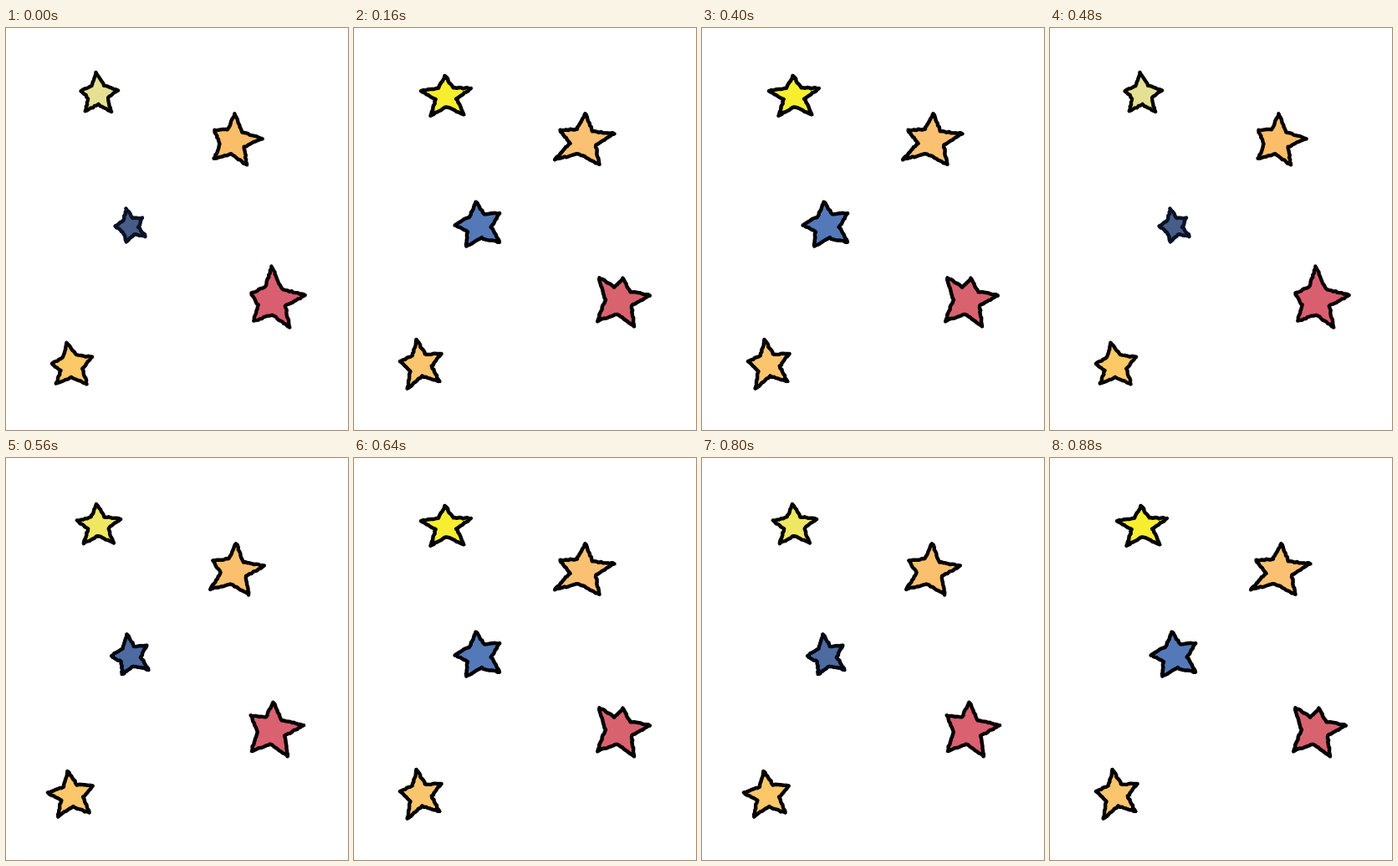
Recreate the animation shown at these times as an HTML page. Size 409 px wide and 480 px high, loop 0.96 s.

```html
<!DOCTYPE html>
<html lang="en">
<head>
<meta charset="utf-8">
<title>Twinkling stars</title>
<style>
html, body { margin: 0; width: 100%; height: 100%; overflow: hidden; background: #fff; }
svg { display: block; width: 100vw; height: 100vh; }
path { stroke-linejoin: round; stroke-linecap: round; }
</style>
</head>
<body>
<svg id="stage" viewBox="0 0 409 480"></svg>
<script>
const STEP = 80;
const NS = 'http://www.w3.org/2000/svg';
const stage = document.getElementById('stage');

// Each look: fill, outline edge, centre x, centre y, notch radius, then five tips clockwise from the top.
const stars = [
  { small: ['#e6e093', '#23220a', 110, 79, 12.5, [108,53, 134,74, 126,100, 95,99, 90,75]],
    big:   ['#f6ee2e', '#000', 110, 81, 13, [109,57, 140,72, 132,104, 91,105, 80,75]] },
  { small: ['#fabe69', '#1c1005', 271, 135, 15.5, [274,102, 307,132, 288,164, 249,156, 249,122]],
    big:   ['#fbc172', '#000', 274, 135, 16, [277,102, 311,126, 293,163, 240,157, 246,122]] },
  { small: ['#465d88', '#0a1226', 148, 237, 10.5, [144,215, 163,227, 167,249, 144,255, 131,237]],
    big:   ['#5479b8', '#000', 149, 236, 15, [146,207, 174,221, 174,256, 134,261, 120,235]] },
  { small: ['#d95f70', '#30060f', 318, 325, 17.5, [318,285, 358,319, 339,357, 296,350, 293,317]],
    big:   ['#d9626f', '#000', 317, 325, 16.5, [322,299, 354,319, 335,356, 291,350, 293,298]] },
  { small: ['#fbc965', '#1c1205', 78, 403, 14, [73,376, 103,393, 97,425, 60,425, 55,401]],
    big:   ['#fbc56d', '#000', 79, 402, 14, [75,372, 104,389, 102,422, 64,431, 55,398]],
    reach: 5 }
];

function random(seed) {
  return () => {
    seed = (seed * 16807) % 2147483647;
    return seed / 2147483647;
  };
}

const mix = (a, b) => (a + b) / 2;

function mixColor(a, b) {
  const parts = c => (c.length === 4 ? c.replace(/[0-9a-f]/g, '$&$&') : c)
    .match(/[0-9a-f]{2}/g).map(h => parseInt(h, 16));
  const q = parts(b);
  return `rgb(${parts(a).map((v, i) => Math.round(mix(v, q[i])))})`;
}

function between({ small: a, big: b, reach = 0 }) {
  const tips = a[5].map((v, i) => mix(v, b[5][i]));
  tips[8] -= reach;
  return [mixColor(a[0], b[0]), mixColor(a[1], b[1]),
    mix(a[2], b[2]), mix(a[3], b[3]), mix(a[4], b[4]), tips];
}

function corners(cx, cy, notch, tips) {
  const out = [];
  for (let i = 0; i < 5; i++) {
    const j = (i + 1) % 5;
    const x = tips[2 * i], y = tips[2 * i + 1];
    const dx = mix(x, tips[2 * j]) - cx;
    const dy = mix(y, tips[2 * j + 1]) - cy;
    const k = notch / Math.hypot(dx, dy);
    out.push([x, y], [cx + dx * k, cy + dy * k]);
  }
  return out;
}

// A closed line with a slightly shaky hand.
function roughPath(points, seed) {
  const rnd = random(seed);
  const shake = () => (rnd() - 0.5) * 1.3;
  const d = [];
  points.forEach(([x, y], i) => {
    const [u, v] = points[(i + 1) % points.length];
    const n = Math.max(2, Math.round(Math.hypot(u - x, v - y) / 2.5));
    for (let s = 0; s < n; s++) {
      const t = s / n;
      d.push(`${(x + (u - x) * t + shake()).toFixed(1)} ${(y + (v - y) * t + shake()).toFixed(1)}`);
    }
  });
  return `M${d.join('L')}Z`;
}

function addPath(group, d, fill, stroke, width) {
  const p = document.createElementNS(NS, 'path');
  const attrs = { d, fill, stroke, 'stroke-width': width };
  for (const name in attrs) p.setAttribute(name, attrs[name]);
  group.append(p);
}

function makePose(looks, seed) {
  const group = document.createElementNS(NS, 'g');
  looks.forEach(([fill, edge, cx, cy, notch, tips], i) => {
    const d = roughPath(corners(cx, cy, notch, tips), seed + i * 131);
    addPath(group, d, fill, edge, 4.4);
    addPath(group, d, 'none', i === 2 ? edge : '#050303', 3.4);
  });
  stage.append(group);
  return group;
}

const poses = [
  makePose(stars.map(s => s.small), 4177),
  makePose(stars.map(between), 9203),
  makePose(stars.map(s => s.big), 15391)
];

function draw(ms) {
  const now = Math.floor(ms / STEP) % poses.length;
  poses.forEach((g, i) => g.setAttribute('visibility', i === now ? 'visible' : 'hidden'));
}

let start;
function tick(t) {
  if (start === undefined) start = t;
  draw(t - start);
  requestAnimationFrame(tick);
}
draw(0);
requestAnimationFrame(tick);
</script>
</body>
</html>
```
